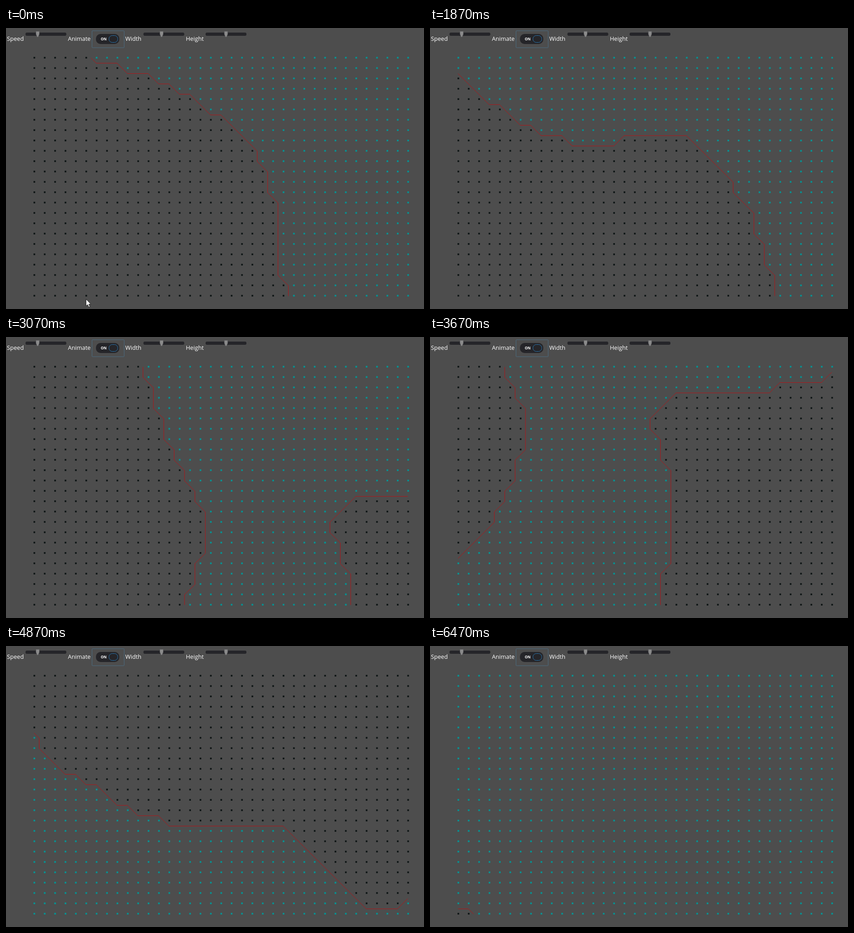
Write an HTML page with a canvas that moves like this. It is 911 by 614 pixels and loops after 6.54 s.

```html
<!DOCTYPE html>
<html lang="en">
<head>
<meta charset="utf-8">
<title>Marching squares</title>
<style>
html, body { margin: 0; width: 100%; height: 100%; overflow: hidden; background: #4d4d4d; }
canvas { display: block; }
</style>
</head>
<body>
<canvas id="stage" width="911" height="614"></canvas>
<script>
const ctx = document.getElementById('stage').getContext('2d');
const LOOP = 6540, LAST_TICK = 97;
const COLS = 37, ROWS = 24;
const BG = '#4d4d4d', TEAL = '#049494', BLACK = '#0d1414', RED = '#b21519', DARK = '#252529';

// Rough outlines of the dark areas in grid units; sampling them on the grid makes the steps.
const WEST = [
  [5.5, 0], [11.3, 2], [15.9, 4], [21.3, 9], [23.1, 14], [24.1, 22], [26.05, 27], [34.5, 36],
  [39.6, 39], [42.8, 40.1], [47.2, 40.1], [48, 39.6], [54.2, 39.6], [58.3, 44], [60.1, 47],
  [65.05, 61], [67.1, 65], [67.4, 69], [64.3, 76], [50, 90], [-2, 90], [-2, -2], [5.5, -2]
];
const EAST = [
  [90, 63.3], [81.7, 63.8], [79.6, 66], [81.1, 71], [81.1, 80], [80.6, 82], [80.6, 86],
  [83.25, 90], [88.9, 93], [93.05, 95], [105.2, 95.5], [113.3, 103.6], [116.3, 103.6],
  [120.1, 99], [126, 86], [126, 56]
];
const SOUTH = [[106, 129.4], [109.8, 131.2], [106, 134]];

function outline(points) {
  const path = new Path2D();
  for (const [x, y] of points) path.lineTo(x, y);
  path.closePath();
  return path;
}
const areas = [WEST, EAST, SOUTH].map(outline);
const isDark = (u, v) => areas.some(area => ctx.isPointInPath(area, u, v));

// Whole cells of diagonal travel; the clock lags slightly after a hiccup.
const cellsTravelled = tick => Math.floor(1.115 * tick + (tick > 35 ? .6 : .8));

const gridX = i => 61 + 22.63 * i;
const gridY = j => 65.6 + 22.61 * j;

function drawDots(dark) {
  dark.forEach((row, j) => row.forEach((isBlack, i) => {
    ctx.fillStyle = isBlack ? BLACK : TEAL;
    ctx.fillRect(gridX(i) - 1.05, gridY(j) - 2.5, 3.6, 3.6);
  }));
}

// Marching squares: join the middles of the cell edges where the shade changes.
function drawContour(dark) {
  ctx.beginPath();
  for (let j = 0; j < ROWS - 1; j++) {
    for (let i = 0; i < COLS - 1; i++) {
      const a = dark[j][i], b = dark[j][i + 1], c = dark[j + 1][i + 1], d = dark[j + 1][i];
      const cuts = [];
      if (a !== b) cuts.push([i + .5, j]);
      if (b !== c) cuts.push([i + 1, j + .5]);
      if (c !== d) cuts.push([i + .5, j + 1]);
      if (d !== a) cuts.push([i, j + .5]);
      cuts.forEach(([x, y], k) => ctx[k % 2 ? 'lineTo' : 'moveTo'](gridX(x), gridY(y)));
    }
  }
  ctx.lineWidth = 1;
  ctx.strokeStyle = RED;
  ctx.stroke();
}

function drawField(shift) {
  const dark = Array.from({ length: ROWS }, (_, j) =>
    Array.from({ length: COLS }, (_, i) => isDark(i + shift, j + shift)));
  drawDots(dark);
  drawContour(dark);
}

function pill(x, y, w, h, r) {
  ctx.beginPath();
  ctx.roundRect(x, y, w, h, r);
}

function label(text, x, y, font = '12.7px') {
  ctx.font = font + ' "Open Sans", sans-serif';
  ctx.fillStyle = '#fff';
  ctx.fillText(text, x, y);
}

function polygon(points, x, y, fill, stroke) {
  ctx.save();
  ctx.translate(x, y);
  const path = outline(points);
  ctx.fillStyle = fill;
  ctx.fill(path);
  ctx.lineWidth = 1;
  ctx.strokeStyle = stroke;
  ctx.stroke(path);
  ctx.restore();
}

function slider(x, knob) {
  ctx.fillStyle = DARK;
  pill(x, 10, 89, 7, 3);
  ctx.fill();
  polygon([[-3.5, 0], [3.5, 0], [3.5, 6], [1, 12], [-1, 12], [-3.5, 6]], knob, 7.5, '#8b8b8b', '#666668');
}

function drawControls() {
  label('Speed', 2, 28);
  slider(42.5, 69);
  label('Animate', 135, 28);
  label('Width', 260, 28);
  slider(299.5, 339);
  label('Height', 392, 28);
  slider(435, 479.5);

  ctx.lineWidth = 1;
  ctx.strokeStyle = '#4b6a80';
  pill(187.5, 6, 70, 37, 1);
  ctx.stroke();
  ctx.fillStyle = DARK;
  pill(196, 13, 51, 22, 10);
  ctx.fill();
  label('ON', 206.5, 27, 'bold 8px');
  ctx.strokeStyle = '#2b75ac';
  pill(224.5, 16.5, 19, 15, 7);
  ctx.stroke();
}

function drawCursor(x, y) {
  const arrow = [[0, 0], [0, 15], [3.5, 12], [6, 17.5], [8.5, 16.5], [6, 11], [10.5, 11]];
  polygon(arrow, x, y, '#fff', '#222');
}

function draw(tick) {
  ctx.fillStyle = BG;
  ctx.fillRect(0, 0, 911, 614);
  drawField(cellsTravelled(tick));
  drawControls();
  if (tick === 0) drawCursor(174.5, 592.5);
}

// Fifteen ticks a second, aligned to hundredths of a second.
const tickAt = ms => Math.min(LAST_TICK, Math.floor((Math.floor(ms / 10) + .5) * .15));

const start = performance.now();
let shown = -1;
function frame() {
  const tick = tickAt((performance.now() - start) % LOOP);
  if (tick !== shown) draw(shown = tick);
  requestAnimationFrame(frame);
}
frame();
</script>
</body>
</html>
```
